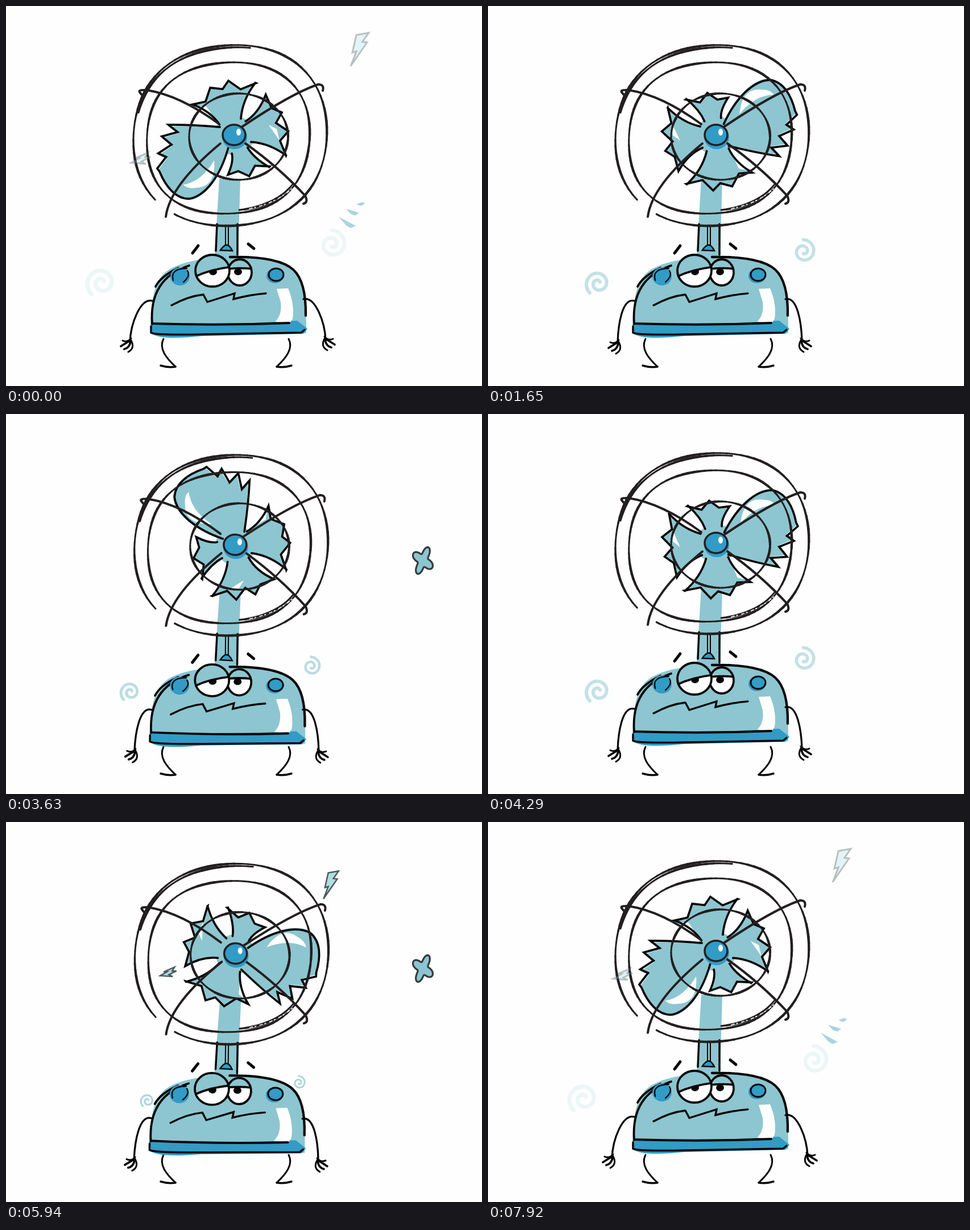
Animation, 837 px wide and 669 px high, one loop 8 s. Source, as an HTML page with a canvas:

```html
<!DOCTYPE html>
<html lang="en">
<head>
<meta charset="utf-8">
<title>Tired fan</title>
<style>
html, body { margin: 0; width: 100%; height: 100%; overflow: hidden; background: #fefefe; }
canvas { display: block; }
</style>
</head>
<body>
<canvas id="stage" width="837" height="669"></canvas>
<script>
const ctx = document.getElementById('stage').getContext('2d');
const TEAL = '#8dc6d0', BLUE = '#329bc6', INK = '#060606', WIRE = '#231f20', WHITE = '#fefefe';
const LOOP = 8000, STEP = 330, STEPS = 24;
const HUB = { x: 401, y: 228 };
const { PI, sin, cos, max, min } = Math;
const rad = deg => deg * PI / 180;
const lerp = (a, b, k) => a + (b - a) * k;
const noise = n => { const v = sin(n * 127.1) * 43758.5; return v - Math.floor(v) - .5; };

function ink(path, width = 3, color = INK) {
  ctx.strokeStyle = color;
  ctx.lineWidth = width;
  ctx.stroke(new Path2D(path));
}

function fill(path, color) {
  ctx.fillStyle = color;
  ctx.fill(new Path2D(path));
}

function oval(x, y, rx, ry, color, width) {
  ctx.beginPath();
  ctx.ellipse(x, y, rx, ry, 0, 0, 2 * PI);
  if (width) {
    ctx.strokeStyle = color;
    ctx.lineWidth = width;
    ctx.stroke();
  } else {
    ctx.fillStyle = color;
    ctx.fill();
  }
}

function group(x, y, angle, scale, draw) {
  ctx.save();
  ctx.translate(x, y);
  ctx.rotate(angle);
  ctx.scale(scale, scale);
  draw();
  ctx.restore();
}

// Draws a left-hand limb and its mirror image.
function pair(width, lift, draw) {
  draw();
  ctx.save();
  ctx.translate(width, lift);
  ctx.scale(-1, 1);
  draw();
  ctx.restore();
}

// Blades are built around the hub in polar coordinates (degrees).
const polar = (deg, r) => `${r * cos(rad(deg))} ${r * sin(rad(deg))}`;

function teeth(from, to, r0, r1, count, seed) {
  let path = '';
  for (let i = 0; i <= count; i++) {
    const k = i / count, inward = i % 2 ? .84 + noise(seed + i) * .1 : 1;
    path += 'L' + polar(lerp(from, to, k + noise(seed - i) * .08), lerp(r0, r1, k) * inward);
  }
  return path;
}

function tornBlade(from, to, r0, r1, count, seed) {
  const inset = (to - from) * .12;
  return `M${polar(from, 32)}Q${polar(from + inset, r0 * .65)} ${polar(from, r0)}`
    + teeth(from, to, r0, r1, count, seed)
    + `Q${polar(to - inset, r1 * .65)} ${polar(to, 32)}`;
}

const bladePaths = [
  'M14 -20C36 -66 68 -96 97 -96C121 -92 134 -67 140 -40'
    + teeth(-14, 20, 147, 117, 6, 3) + 'Q70 32 22 19',
  tornBlade(-128, -73, 83, 70, 4, 8),
  tornBlade(211, 139, 98, 91, 6, 5),
  tornBlade(122, 47, 100, 91, 6, 12)
];
const shines = [
  'M42 -37Q47 -84 82 -79Q97 -79 103 -70Q70 -70 42 -37Z',
  'M-47 -64L-26 -22L-45 -42Z',
  'M-77 -22L-63 8L-76 -2Z',
  'M23 24Q47 38 56 63L39 59Z'
];

function blades(angle) {
  group(HUB.x, HUB.y, angle, 1, () => {
    ctx.rotate(-.025);
    bladePaths.forEach(p => fill(p, TEAL));
    oval(0, 0, 36, 34, TEAL);
    ctx.rotate(.025);
    shines.forEach(p => fill(p, WHITE));
    bladePaths.forEach(p => ink(p, 3.7));
  });
}

function hub() {
  oval(402, 231, 22, 21, BLUE);
  oval(401, 227, 20, 18, WIRE, 3.5);
  oval(409, 222, 4, 6, WHITE);
}

// An ellipse bent towards a rounded square, drawn with a varying pen.
function ring(x, y, rx, ry, from, to, bend = {}) {
  const { square = 0, skew = 0, lean = 0, dir = 0 } = bend;
  const point = deg => {
    const a = rad(deg);
    const f = 1 + square * (1 - cos(4 * a)) - skew * sin(2 * a) + lean * cos(a - rad(dir));
    return `${x + rx * f * cos(a)} ${y + ry * f * sin(a)}`;
  };
  for (let d = from; d < to; d += 4) {
    ink(`M${point(d)}L${point(min(d + 4, to))}`, 3.7 + .8 * sin(d * .13), WIRE);
  }
}

function cage() {
  const outer = { square: .0175, skew: .0175, lean: .0275, dir: 45 };
  const inner = { square: .024, skew: .019, lean: .037, dir: -45 };
  ring(391, 225, 170, 159, 136, 482, outer);
  ring(394, 227, 171, 157, 195, 282, outer);
  ring(387, 236, 143, 133, 0, 360, inner);
  ring(386, 233, 143, 131, 36, 80, inner);
  ring(409, 230, 87, 76, 0, 360);
  ctx.setLineDash([5, 4, 2, 7]);
  ink('M428 357Q475 347 503 321', 1.6, WHITE);
  ctx.setLineDash([]);
  ink('M375 208Q306 157 247 148Q229 147 237 154Q239 158 244 158', 4, WIRE);
  ink('M416 212Q502 154 549 138Q560 138 557 149', 4, WIRE);
  ink('M421 242Q480 284 526 334Q532 346 523 348', 4, WIRE);
  ink('M377 242Q288 316 281 371', 4, WIRE);
}

function column() {
  fill('M375 304H412L408 445L367 440Z', TEAL);
  ink('M371 384L369 431M407 384L407 438', 3.5);
  ink('M386 386V421M391 386V421', 2);
  const dome = 'M377 430Q389 411 398 431Z';
  fill(dome, BLUE);
  ink(dome, 2.5);
}

function base() {
  fill('M254 576Q254 500 272 478Q292 446 400 440Q480 440 505 464Q529 490 528 576Z', TEAL);
  fill('M254 561L395 560L512 554L530 568L523 577L345 581Q270 589 255 576Z', BLUE);
  fill('M476 498L496 497Q508 526 504 551L499 558L473 556Q486 544 483 521Z', WHITE);
  ink('M257 560Q251 480 322 457M263 494Q272 476 303 461', 3.8);
  ink('M394 442Q478 440 505 464Q528 485 527 545', 4.3);
  ink('M257 559Q380 563 498 558', 4);
  ink('M255 564L255 575Q262 580 350 578L519 575L525 570', 3.5);
  oval(306, 476, 17, 16, BLUE);
  ink('M318 462Q288 462 294 483M312 486Q325 475 319 466', 2.3);
  oval(473, 475, 15, 13, BLUE);
  oval(475, 473, 13, 11, INK, 3);
}

function eye(x, y, rx, ry, lid, pupil) {
  oval(x, y, rx, ry, WHITE);
  ctx.save();
  ctx.clip();
  oval(pupil, 468, 7, 6, INK);
  fill(lid + 'V420H320Z', TEAL);
  ink(lid, 3.8);
  ctx.restore();
  oval(x, y, rx, ry, INK, 3.8);
}

function face() {
  eye(411, 469, 21, 23, 'M380 464Q410 460 436 463', 408);
  eye(363, 466, 30, 28, 'M326 480Q354 464 398 459', 364);
  ink('M338 422L328 435M426 419L436 427', 5);
  ink('M291 527Q320 511 347 508L354 521L402 506L400 516Q430 508 457 506', 3.4);
}

function arms(swing) {
  pair(780, -3, () => {
    ink(`M257 519C236 514 ${229 - swing} 560 ${228 - swing} 592`, 3.3);
    group(-swing, swing * -.3, 0, 1, () => {
      ink('M230 588Q224 596 215 592M229 590Q238 605 225 612', 3);
      ink('M228 592L212 602M229 594Q227 605 218 607', 3.8);
    });
  });
}

function legs() {
  pair(774, 0, () => {
    ink('M277 586C268 603 282 620 298 635', 3);
    ink('M298 635Q285 637 272 633', 3.5);
  });
}

function spiral(x, y, radius, start) {
  let path = '';
  for (let i = 0; i <= 60; i++) {
    const k = i / 60, a = start + k * 9.6, r = radius * lerp(.9, .16, k);
    path += `${i ? 'L' : 'M'}${x + r * cos(a)} ${y + r * sin(a)}`;
  }
  ink(path, radius * .24, TEAL);
}

function drawSpirals(step) {
  const q = 1.1 * ((step + 6) % 8 / 8) ** .55;
  const radius = 14 + 17 * q;
  ctx.globalAlpha = max(0, min(.7 - .3 * q, (1.03 - q) * 1.6));
  spiral(249 - 86 * q, 491 - 4 * q, radius, 2.3);
  spiral(515 + 62 * q, 459 - 42 * q, radius * .93, -1.6);
}

function bolt(path) {
  fill(path, '#a9d7de');
  ink(path, 3, '#3b4649');
}

function drawBolts(step) {
  const b = (step + 2) % 4.8 / 2;
  if (b > 1.05) return;
  const scale = .72 + .28 * b;
  ctx.globalAlpha = min(.88, 1.26 - .95 * b);
  group(538 + 84 * b, 134 - 57 * b, 0, scale,
    () => bolt('M-6 -26L16 -30L5 -14L13 -13L-16 29L-6 3L-13 5Z'));
  group(318 - 81 * b, 261 + 7 * b, 0, scale,
    () => bolt('M-17 8L-3 0L-10 0L13 -10L8 -2L17 -2L1 6L9 10Z'));
}

function drawWind(step) {
  if ((step + 2) % 8 > 2) return;
  const w = step / 8;
  ctx.globalAlpha = max(0, .75 - .36 * w);
  ctx.translate(27 * w, 15 * w);
  fill('M585 371L615 387L606 391L598 386Z', TEAL);
  fill('M598 357L621 364L614 369L606 366Z', TEAL);
  fill('M616 349L627 345L631 348L624 352Z', TEAL);
}

function drawFlower(step) {
  const k = (step + 4) % 7;
  if (k > 1) return;
  let path = '';
  for (let d = 0; d < 360; d += 6) {
    const r = 16 + 6 * cos(rad(4 * (d + 68)));
    path += `${d ? 'L' : 'M'}${r * .9 * cos(rad(d))} ${r * 1.18 * sin(rad(d))}`;
  }
  group(690 + 43 * k, 268 - 10 * k, .12, .75 + .25 * k, () => {
    fill(path, TEAL);
    ink(path + 'Z', 3.2, '#343d40');
  });
}

function layer(draw, step) {
  ctx.save();
  draw(step);
  ctx.restore();
}

function draw(step) {
  ctx.fillStyle = WHITE;
  ctx.fillRect(0, 0, 837, 669);
  ctx.lineCap = 'round';
  ctx.miterLimit = 4;
  legs();

  const stormy = (step + 7) % STEPS < 12;
  const sag = 4.5 * max(0, cos((step - 18) * PI / 4));
  const settle = 15 * (1 - 2 ** (-step / 2));
  const turn = [170, -13.5, 13, 248][step % 4] + settle;
  group(400, 400 + sag, sag * .0034, 1, () => {
    ctx.translate(-400, -400);
    column();
    blades(rad(turn));
    hub();
    cage();
    base();
    face();
    arms(stormy && step % 4 === 0 ? 10 : 0);
  });

  layer(drawSpirals, step);
  if (stormy) layer(drawBolts, step);
  layer(drawWind, step);
  layer(drawFlower, step);
}

function tick() {
  draw(Math.floor(performance.now() % LOOP / STEP) % STEPS);
  requestAnimationFrame(tick);
}
tick();
</script>
</body>
</html>
```
